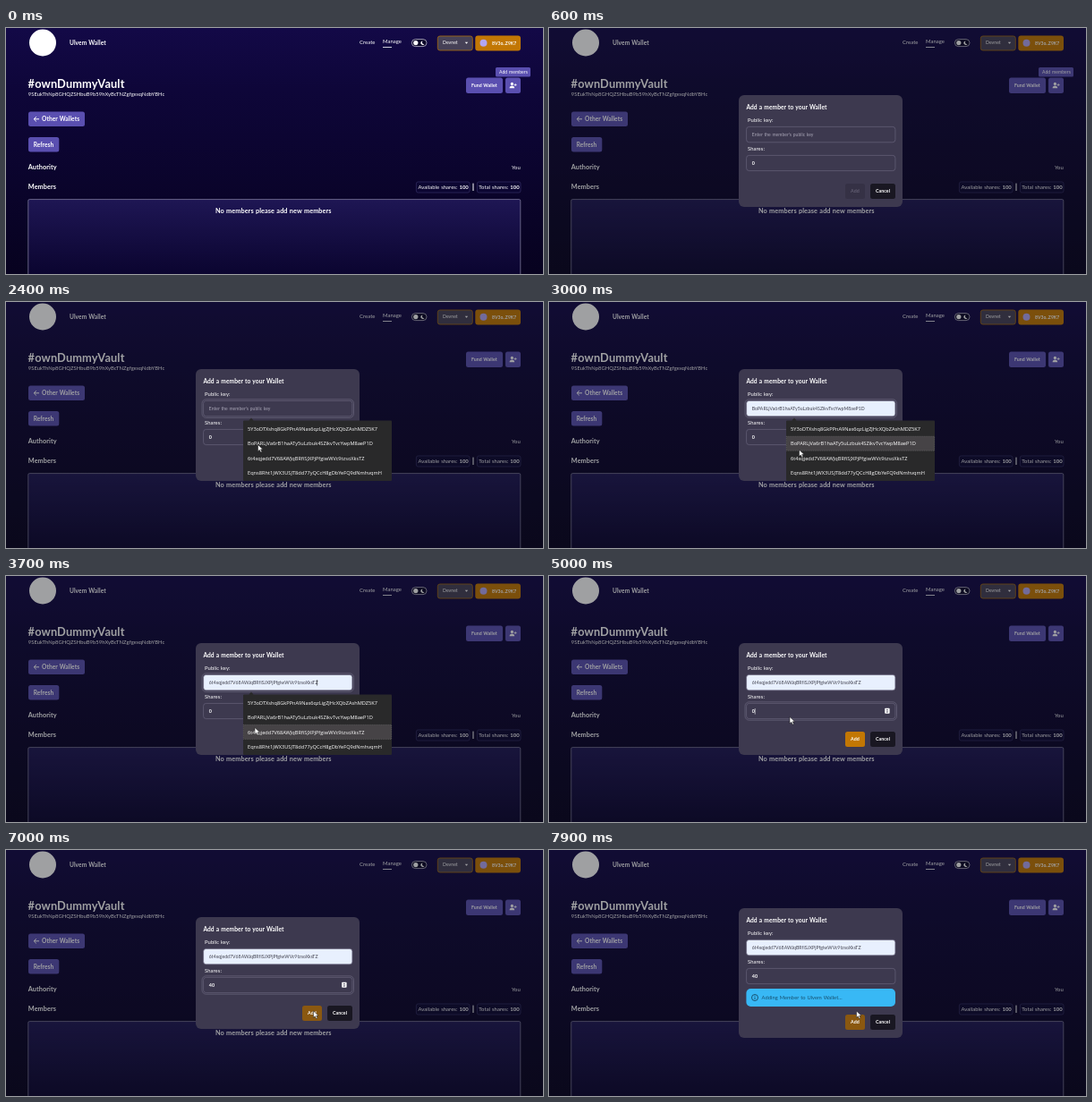
Animation, 600 px wide and 275 px high, one loop 8 s. Source, as an HTML page:

```html
<!DOCTYPE html>
<html lang="en">
<head>
<meta charset="utf-8">
<title>Add a member</title>
<style>
  html, body { margin: 0; width: 100%; height: 100%; overflow: hidden; background: #0a0430; }
  svg { display: block; width: 600px; height: 275px; }
  text { font: 5.9px Lato, "Open Sans", sans-serif; fill: #fff; letter-spacing: .01em; word-spacing: .06em; white-space: pre; }
  .b { font-weight: 700; }
  .h { font-size: 7.3px; font-weight: 700; }
  .btn { fill: #5a4fb0; }
  .chip { fill: #0c0632; stroke: #2f2a5e; stroke-width: .8; }
  .small { font-size: 5.1px; }
  .mid { text-anchor: middle; }
  .field { fill: #3d394f; stroke: #67637b; stroke-width: .7; }
  .ring { fill: none; stroke: #716d85; stroke-width: .6; }
  .hint { font-size: 5px; fill: #a9a6b6; }
  .menu text { font: 5.65px "Open Sans", "Noto Sans", sans-serif; letter-spacing: 0; word-spacing: 0; }
</style>
</head>
<body>
<svg viewBox="0 0 600 275">
  <defs>
    <linearGradient id="sky" x2="0" y2="1">
      <stop offset="0" stop-color="#130947"/>
      <stop offset=".25" stop-color="#0e0639"/>
      <stop offset="1" stop-color="#07021f"/>
    </linearGradient>
    <linearGradient id="panel" x2="0" y2="1">
      <stop offset="0" stop-color="#1e1654"/>
      <stop offset="1" stop-color="#08022a"/>
    </linearGradient>
  </defs>

  <!-- page -->
  <rect width="600" height="275" fill="url(#sky)"/>
  <circle cx="41" cy="16.5" r="15" fill="#fff"/>
  <text class="b" x="71" y="18.8" style="font-size:6.6px">Ulvem Wallet</text>
  <text x="395" y="18.4">Create</text>
  <text x="421" y="17.2">Manage</text>
  <path d="M421 21.5h10" stroke="#fff" stroke-width=".8"/>
  <rect x="453.4" y="12.6" width="16.6" height="8" rx="4" fill="#0a0528" stroke="#d8d6e4" stroke-width=".7"/>
  <circle cx="457.8" cy="16.6" r="2.6" fill="#fff"/>
  <path d="M465.6 14.4a2.3 2.3 0 1 0 2 3.4a2 2 0 0 1-2-3.4z" fill="#fff"/>
  <rect x="482.3" y="9" width="39" height="16" rx="2.5" fill="#464157" stroke="#a96d0c" stroke-width=".8"/>
  <text class="small" x="488" y="18.3">Devnet</text>
  <path d="M512.8 15.8h3.4l-1.7 2z" fill="#fff"/>
  <rect x="524.3" y="8.6" width="50.7" height="16.8" rx="3" fill="#c27704"/>
  <circle cx="533.5" cy="16.8" r="4" fill="#b3a6f2"/>
  <text class="b" x="543" y="18.7" style="font-size:5px">8V3o..Z9K7</text>

  <text class="b" x="24.6" y="67.4" style="font-size:12.8px">#ownDummyVault</text>
  <text x="24.8" y="75.8" style="font-size:5.83px">9SEukThNp8GHQZSHbuB9b59hXyBcTNZgfgexqNdbYBHc</text>
  <rect class="btn" x="514" y="55.5" width="41" height="17.5" rx="2.5"/>
  <text class="b" x="520" y="66" style="font-size:5.2px">Fund Wallet</text>
  <rect class="btn" x="558" y="55.5" width="17" height="17.5" rx="2.5"/>
  <g fill="#fff">
    <circle cx="565.4" cy="62.4" r="1.6"/>
    <path d="M562.6 67.2c0-3.6 5.6-3.6 5.6 0z"/>
    <path d="M567.6 63.6h3M569.1 62.1v3" stroke="#fff" stroke-width=".8"/>
  </g>
  <g id="tip">
    <rect class="btn" x="547" y="44" width="39" height="10.4" rx="1.5"/>
    <text class="small" x="551" y="51.1">Add members</text>
  </g>
  <rect class="btn" x="25" y="93.5" width="63" height="16.5" rx="2.5"/>
  <path d="M37 101.8h-5.6m2.4-2.6l-2.6 2.6l2.6 2.6" fill="none" stroke="#fff" stroke-width="1"/>
  <text class="b" x="40" y="104.1" style="font-size:6.6px">Other Wallets</text>
  <rect class="btn" x="25" y="122" width="34.3" height="16.5" rx="2.5"/>
  <text class="b" x="30.7" y="132.6" style="font-size:6.5px">Refresh</text>
  <text class="h" x="24.8" y="157.8">Authority</text>
  <text x="565" y="157.7">You</text>
  <text class="h" x="24.8" y="180.4">Members</text>
  <rect class="chip" x="458.4" y="172" width="59.6" height="12" rx="2"/>
  <text x="460.5" y="180">Available shares: <tspan class="b">100</tspan></text>
  <path d="M522 173.6v8.4" stroke="#fff" stroke-width="1"/>
  <rect class="chip" x="526.4" y="172" width="48.6" height="12" rx="2"/>
  <text x="528.3" y="180">Total shares: <tspan class="b">100</tspan></text>
  <rect x="24.8" y="191.6" width="550" height="96" rx="1.5" fill="url(#panel)" stroke="#7d7999" stroke-width=".8"/>
  <text class="b mid" x="298.8" y="206.6" style="font-size:7.3px">No members please add new members</text>

  <rect id="dim" width="600" height="275" fill="#111318"/>

  <!-- dialog, drawn from its own top edge -->
  <g id="modal">
    <rect id="box" x="212" width="183" rx="6" fill="#3d394f"/>
    <text class="b" x="220.4" y="16.1" style="font-size:6.65px">Add a member to your Wallet</text>
    <text x="222" y="30.4">Public key:</text>
    <rect id="keyRing" class="ring" x="219" y="33.8" width="169.5" height="20.6" rx="4.5"/>
    <rect id="keyField" class="field" x="220.6" y="35.4" width="166.3" height="17.4" rx="3"/>
    <text id="keyText" x="226.8" y="46"></text>
    <text x="222" y="61.8">Shares:</text>
    <rect id="numRing" class="ring" x="219" y="65.8" width="169.5" height="20.4" rx="4.5"/>
    <rect class="field" x="220.6" y="67.4" width="166.3" height="17.2" rx="3"/>
    <text id="numText" x="226.8" y="78"></text>
    <g id="spin">
      <rect x="375.2" y="72.8" width="5.4" height="6" rx=".8" fill="#fff"/>
      <path d="M376.6 75.2h2.6l-1.3-1.5zM376.6 76.4h2.6l-1.3 1.5z" fill="#3d394f"/>
    </g>
    <path id="caret" stroke-width=".6"/>
    <text id="error" x="220.4" y="93.4" style="font-size:5.75px;fill:#c9800f">Enter a valid number of shares.</text>
    <g id="alert">
      <rect x="220.4" y="90" width="166.6" height="20" rx="5" fill="#38b8f5"/>
      <g fill="none" stroke="#123a52" stroke-width=".8">
        <circle cx="230" cy="100" r="3.5"/>
        <path d="M230 99.6v2.3M230 97.8v.9"/>
      </g>
      <text x="237.6" y="102" style="font-size:5.75px;fill:#17506f">Adding Member to Ulvem Wallet...</text>
    </g>
    <g id="actions">
      <rect id="add" x="331" y="98.9" width="22" height="17" rx="2.5"/>
      <text id="addText" class="b mid" x="342" y="109.4" style="font-size:5.3px">Add</text>
      <rect x="359" y="98.9" width="28" height="17" rx="2.5" fill="#191722"/>
      <text class="b mid" x="373" y="109.4" style="font-size:5.3px">Cancel</text>
    </g>
  </g>

  <g id="menu" class="menu">
    <path d="M265 133.4q0-1 1-1h5.4l2.6-2.8l2.6 2.8H430q1 0 1 1V199q0 1-1 1H266q-1 0-1-1z" fill="#29292a"/>
    <rect id="hover" x="265.3" width="165.4" height="16" fill="#464346" stroke="#777" stroke-width=".5" stroke-dasharray="1 1"/>
  </g>

  <path id="arrow" d="M0 0v7.4l1.8-1.6l1.3 2.8l1.4-.7l-1.3-2.6h2.4z" fill="#fff" stroke="#111" stroke-width=".5"/>
  <path id="beam" d="M-1.2-3.5h2.4M0-3.5v7M-1.2 3.5h2.4" stroke="#fff" stroke-width=".6"/>
</svg>
<script>
const LOOP = 8000;
const KEYS = [
  '5Y3oDTXshq8GkPPnA9Nas6qzLigZJHcXQbZAshMDZ5K7',
  'BoPARLjVa6rB1haATy5uLzbuk4SZikvTvcYwpM8aeP1D',
  '6t4xqjedd7V68AWJqBRfiSJXPjPfgiwWVc9tzsoXksTZ',
  'Eqns8Rht1jWX3USJT8dd77yQCcH8gDbYeFQ9dNmhvqmH'
];
// pointer stops: time, x, y
const PATH = [
  [1050, 574, 66], [1300, 318, 119], [1800, 300, 121], [2100, 286, 150], [2400, 281.5, 159.5],
  [2800, 281, 160], [3100, 279, 167], [3500, 278, 169.5], [4400, 278, 169.5], [4650, 270, 151],
  [4800, 270, 151], [5000, 269, 157.5], [6600, 269, 157.5], [7000, 343.5, 180], [8000, 343.5, 180]
];
const el = Object.fromEntries([...document.querySelectorAll('[id]')].map(n => [n.id, n]));
const show = (node, on) => node.setAttribute('visibility', on ? 'visible' : 'hidden');
const set = (node, attrs) => Object.entries(attrs).forEach(([k, v]) => node.setAttribute(k, v));
const clamp = v => Math.min(1, Math.max(0, v));
const ease = v => v * v * (3 - 2 * v);
const within = (t, a, b) => t >= a && t < b;
const rowY = i => 142 + i * 16.2;

KEYS.forEach((key, i) => {
  const row = document.createElementNS('http://www.w3.org/2000/svg', 'text');
  set(row, { x: 270, y: rowY(i) + 2.1 });
  row.textContent = key;
  el.menu.append(row);
});

function pointer(t) {
  const i = Math.max(1, PATH.findIndex(p => p[0] > t));
  const [a, b] = [PATH[i - 1], PATH[i]];
  const u = ease(clamp((t - a[0]) / (b[0] - a[0])));
  return [a[1] + (b[1] - a[1]) * u, a[2] + (b[2] - a[2]) * u];
}

function drawFields(t, empty) {
  const pick = t < 2700 ? -1 : t < 3050 ? 1 : 2;
  const filled = pick >= 0;
  el.keyText.textContent = filled ? KEYS[pick] : "Enter the member's public key";
  el.keyText.setAttribute('class', filled ? '' : 'hint');
  el.keyText.style.cssText = filled ? 'font-size:5.13px;fill:#41414c' : '';
  el.keyField.style.fill = filled ? '#e8f0fe' : '';

  el.numText.textContent = empty ? "Enter the member's shares" : t < 5400 ? '0' : t < 6450 ? '4' : '40';
  el.numText.setAttribute('class', empty ? 'hint' : 'b');
  el.numText.style.fontSize = empty ? '' : '5.4px';

  const onKey = within(t, 1300, 4700), onNum = within(t, 4700, 7300);
  show(el.keyRing, onKey);
  show(el.numRing, onNum);
  show(el.spin, onNum);

  const blink = onKey
    ? within(t, 1300, 1800) || within(t, 3700, 4300)
    : within(t, 4700, 5300) || within(t, 5400, 5800) || within(t, 6000, 6900);
  const x = onKey ? (filled ? 347.6 : 226.4) : empty ? 226.4 : t < 6450 ? 230.2 : 233.4;
  const y = onKey ? 41 : 73;
  set(el.caret, { d: `M${x} ${y}v6.6`, stroke: onKey && filled ? '#222' : '#fff' });
  show(el.caret, (onKey || onNum) && blink);
}

function render(t) {
  const open = ease(clamp((t - 200) / 300));
  const empty = within(t, 5400, 6300);
  const adding = t >= 7400;
  const height = adding ? 145 : empty ? 136 : 125;
  const scale = .9 + .1 * open;

  show(el.tip, t < 1150);
  set(el.dim, { opacity: .4 * open });
  set(el.modal, {
    opacity: open,
    transform: `translate(303.5 137.5) scale(${scale}) translate(-303.5 ${-height / 2})`
  });
  set(el.box, { height });
  set(el.actions, { transform: `translate(0 ${height - 125})` });
  show(el.error, empty);
  show(el.alert, adding);
  drawFields(t, empty);

  const ready = t >= 3800 && !empty;
  const hot = t >= 6950;
  set(el.add, { fill: hot ? '#8a5810' : ready ? '#c27704' : '#353145' });
  el.addText.style.fill = ready ? '#fff' : '#625e72';

  const menuOpen = within(t, 1800, 3800);
  show(el.menu, menuOpen);
  show(el.hover, menuOpen && t >= 2700);
  set(el.hover, { y: rowY(t < 3050 ? 1 : 2) - 8 });

  const [x, y] = pointer(t);
  const moving = within(t, 1050, 5400) || t >= 6600;
  const overField = x > 220 && x < 387 && (within(y, 110, 128) || (!menuOpen && within(y, 142, 157)));
  [el.arrow, el.beam].forEach(n => set(n, { transform: `translate(${x} ${y})` }));
  show(el.arrow, moving && !overField);
  show(el.beam, moving && overField);
}

const start = performance.now();
function tick() {
  render((performance.now() - start) % LOOP);
  requestAnimationFrame(tick);
}
tick();
</script>
</body>
</html>
```
